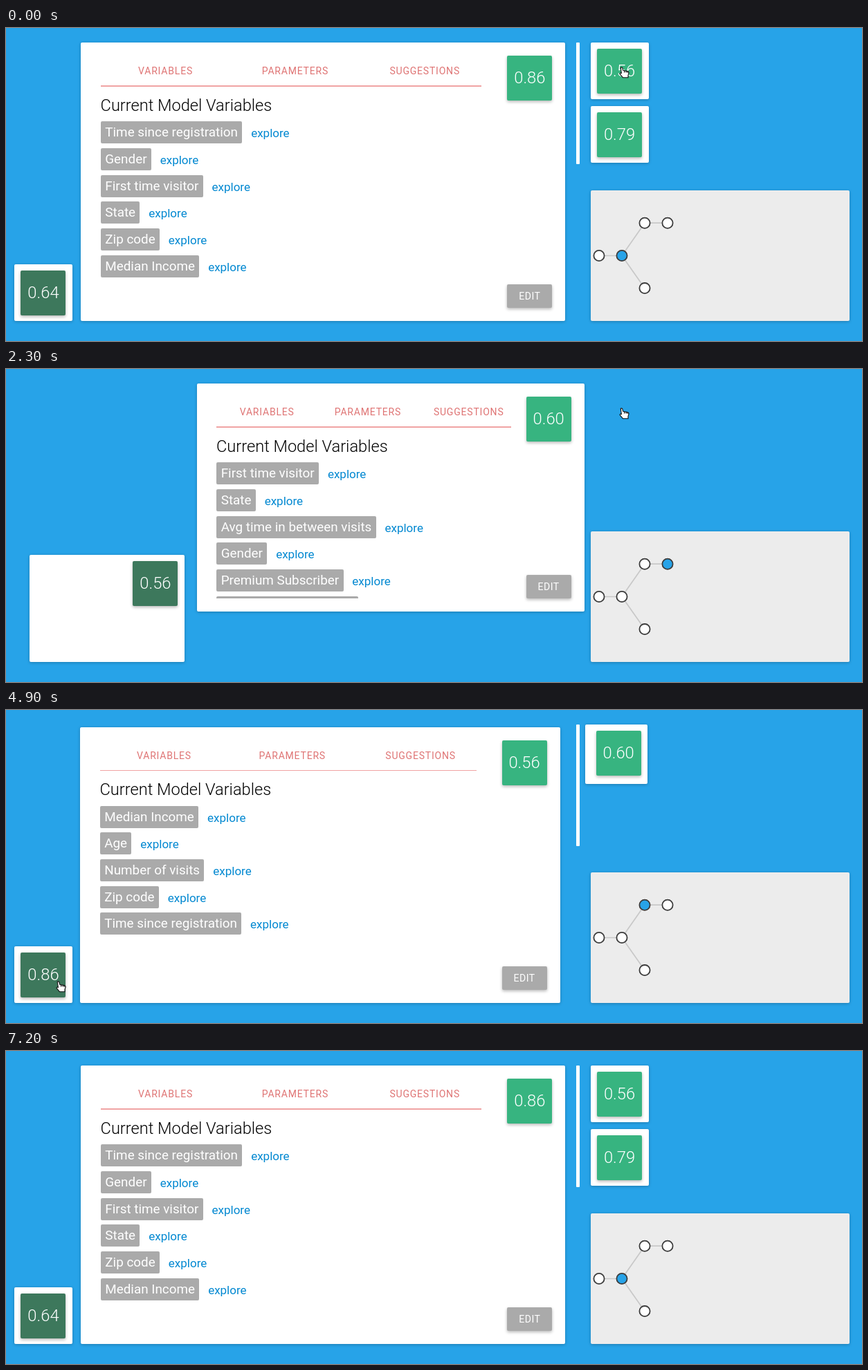
Animation of 1237 by 453 pixels, one loop 7.3 s. Source, as an HTML page:

```html
<!DOCTYPE html>
<html lang="en">
<head>
<meta charset="utf-8">
<title>Model explorer</title>
<style>
html, body { margin: 0; width: 100%; height: 100%; overflow: hidden; background: #27a3e8; }
body { position: relative; font-family: Roboto, sans-serif; }
div, svg, h5 { position: absolute; box-sizing: border-box; margin: 0; white-space: nowrap; }
.card, #graph { background: #fff; border-radius: 2px; box-shadow: 0 1px 4px rgba(0,0,0,.25); }
#bar { left: 824px; top: 21px; width: 5px; height: 176px; background: #fff; border-radius: 1px; }
#graph { left: 845px; top: 235px; width: 374px; height: 189px; background: #ececec; }
#graph line { stroke: #c8c8c8; stroke-width: 1.7; }
#graph circle { fill: #fff; stroke: #3c3c3c; stroke-width: 1.8; }
#graph circle.on { fill: #27a3e8; }
.badge, .edit { width: 65px; border-radius: 2px; color: #fff; text-align: center; box-shadow: 0 2px 4px rgba(0,0,0,.28); }
.badge { right: 9.5px; top: 8.5px; height: 65px; background: #37b480; font: 300 23.78px/65px Roboto, sans-serif; }
.parent .badge { background: #3d785c; }
.main .badge { right: 19px; top: 19px; }
.edit { right: 19px; bottom: 19px; height: 34px; background: #aaa; font-size: 14px; line-height: 34px; letter-spacing: .5px; }
.content, .edit { display: none; }
.main .content, .main .edit { display: block; }
.content { inset: 0 0 19px; overflow: hidden; }
.tabs { left: 28.5px; top: 31px; height: 20px; overflow: hidden; }
.tab { width: 33.333%; text-align: center; color: #df7474; font-size: 14px; line-height: 20px; letter-spacing: .8px; }
.rule { left: 28.5px; top: 62.3px; height: 1.6px; background: #f0a3a3; }
h5 { left: 28.2px; top: 75.5px; font-size: 23.6px; font-weight: 300; line-height: 30px; color: #000; }
.row { left: 28.5px; font-size: 17px; line-height: 32px; color: #0288d1; }
.row a { position: relative; top: 1px; }
.chip { display: inline-block; padding: 0 6.4px; margin-right: 12.8px; border-radius: 2px;
  background: #aaa; color: #fff; font-size: 18.85px; line-height: 32px; }
#cursor { width: 15px; height: 17px; z-index: 9; overflow: visible; }
</style>
</head>
<body>
<div id="bar"></div>
<svg id="graph" viewBox="845 235 374 189"></svg>
<svg id="cursor" viewBox="0 0 15 17">
  <g id="hand" fill="#fff" stroke="#111" stroke-width="1.1" stroke-linejoin="round">
    <path d="M2.2 1.2Q3.8 .2 4.8 1.8L5.6 5.2L12 6.6Q14.2 7.2 14 9.2L13 12.4V15.8H5.6L1.2 10.6Q.8 8.8 2.8 9.2L3.4 9.6Z"/>
    <path d="M7.6 6v2.4M10 6.4v2.2M12 6.9v1.8" fill="none"/>
  </g>
  <g id="beam" fill="none" stroke-linecap="square">
    <path d="M5 3h2l.5.6.5-.6h2M7.5 4v9M5 14h2l.5-.6.5.6h2" stroke="#fff" stroke-width="2.6"/>
    <path d="M5 3h2l.5.6.5-.6h2M7.5 4v9M5 14h2l.5-.6.5.6h2" stroke="#222" stroke-width="1"/>
  </g>
</svg>
<script>
const LOOP = 7300, STEP = 100, GROW = 840;
const $ = id => document.getElementById(id);

// left, top, width, height
const SLOTS = {
  parent: [12.3, 342, 83.7, 82],
  main: [108.4, 21, 700, 403],
  kid1: [845, 21, 83.5, 82],
  kid2: [845, 113.3, 83.5, 82]
};
const ROWS = {
  '0.64': [],
  '0.79': [],
  '0.86': ['Time since registration', 'Gender', 'First time visitor', 'State', 'Zip code', 'Median Income'],
  '0.56': ['Median Income', 'Age', 'Number of visits', 'Zip code', 'Time since registration'],
  '0.60': ['First time visitor', 'State', 'Avg time in between visits', 'Gender', 'Premium Subscriber',
    'Time since registration', 'Number of visits']
};
const VIEWS = [
  { node: 1, '0.64': 'parent', '0.86': 'main', '0.56': 'kid1', '0.79': 'kid2' },
  { node: 2, '0.86': 'parent', '0.56': 'main', '0.60': 'kid1' },
  { node: 3, '0.56': 'parent', '0.60': 'main' }
];
// time, view left, view entered
const MOVES = [[800, 0, 1], [2040, 1, 2], [4332, 2, 1], [5688, 1, 0]];
// time, x, y
const PATH = [[2800, 893, 64.5], [3600, 170, 341.5], [3900, 78.5, 400]];
const CURSOR_GONE = 6400;

const NODES = [[857, 329.5], [890, 329.5], [923, 282.2], [956, 282.2], [923, 376.6]];
const LINKS = [[0, 1], [1, 2], [2, 3], [1, 4]];
$('graph').innerHTML =
  LINKS.map(([a, b]) => `<line x1="${NODES[a][0]}" y1="${NODES[a][1]}" x2="${NODES[b][0]}" y2="${NODES[b][1]}"/>`).join('') +
  NODES.map(([x, y]) => `<circle cx="${x}" cy="${y}" r="7.6"/>`).join('');
const circles = document.querySelectorAll('#graph circle');

const tabs = ['VARIABLES', 'PARAMETERS', 'SUGGESTIONS']
  .map((name, i) => `<div class="tab" style="left:${i * 33.333}%">${name}</div>`).join('');

function makeCard(value) {
  const el = document.createElement('div');
  const rows = ROWS[value].map((name, i) =>
    `<div class="row" style="top:${114.3 + i * 38.65}px"><span class="chip">${name}</span><a>explore</a></div>`).join('');
  el.innerHTML = `<div class="content"><div class="tabs">${tabs}</div><div class="rule"></div>
    <h5>Current Model Variables</h5>${rows}</div><div class="edit">EDIT</div><div class="badge">${value}</div>`;
  document.body.append(el);
  return { value, el, tabs: el.querySelector('.tabs'), rule: el.querySelector('.rule') };
}
const cards = Object.keys(ROWS).map(makeCard);

const mix = (a, b, p) => a + (b - a) * p;
const easeOut = u => 1 - (1 - Math.min(u, 1)) ** 4;
const show = (el, on) => el.style.display = on ? '' : 'none';

function drawCard(card, from, to, p) {
  const { value, el } = card, role = to[value], old = from[value] || role;
  show(el, role);
  if (!role) return;
  const [x, y, w, h] = SLOTS[role].map((v, i) => mix(SLOTS[old][i], v, p));
  el.className = 'card ' + role;
  Object.assign(el.style, {
    left: x + 'px', top: y + 'px', width: w + 'px', height: h + 'px',
    zIndex: role === 'main' ? 3 : old === role ? 2 : 1
  });
  card.tabs.style.width = Math.max(0, .89 * w - 61) + 'px';
  card.rule.style.width = Math.max(0, .89 * w - 73) + 'px';
}

function cursorAt(t) {
  const next = PATH.findIndex(k => t < k[0]);
  if (next === 0) return PATH[0].slice(1);
  if (next < 0) return PATH[PATH.length - 1].slice(1);
  const a = PATH[next - 1], b = PATH[next], u = (t - a[0]) / (b[0] - a[0]);
  return [mix(a[1], b[1], u), mix(a[2], b[2], u)];
}

function draw(t) {
  const [start, from, to] = MOVES.filter(m => t > m[0]).pop() || [-GROW, 0, 0];
  const view = VIEWS[to], p = easeOut((t - start) / GROW);
  cards.forEach(c => drawCard(c, VIEWS[from], view, p));
  circles.forEach((c, i) => c.classList.toggle('on', i === view.node));
  show($('bar'), view.node !== 3);

  const [x, y] = cursorAt(t), overText = x > 108 && x < 808;
  show($('cursor'), t < CURSOR_GONE);
  $('cursor').style.left = x - 7 + 'px';
  $('cursor').style.top = y - 8.5 + 'px';
  show($('hand'), !overText);
  show($('beam'), overText);
}

const begin = performance.now();
function tick() {
  const t = (performance.now() - begin) % LOOP;
  draw(Math.floor(t / STEP) * STEP);
  requestAnimationFrame(tick);
}
tick();
</script>
</body>
</html>
```
